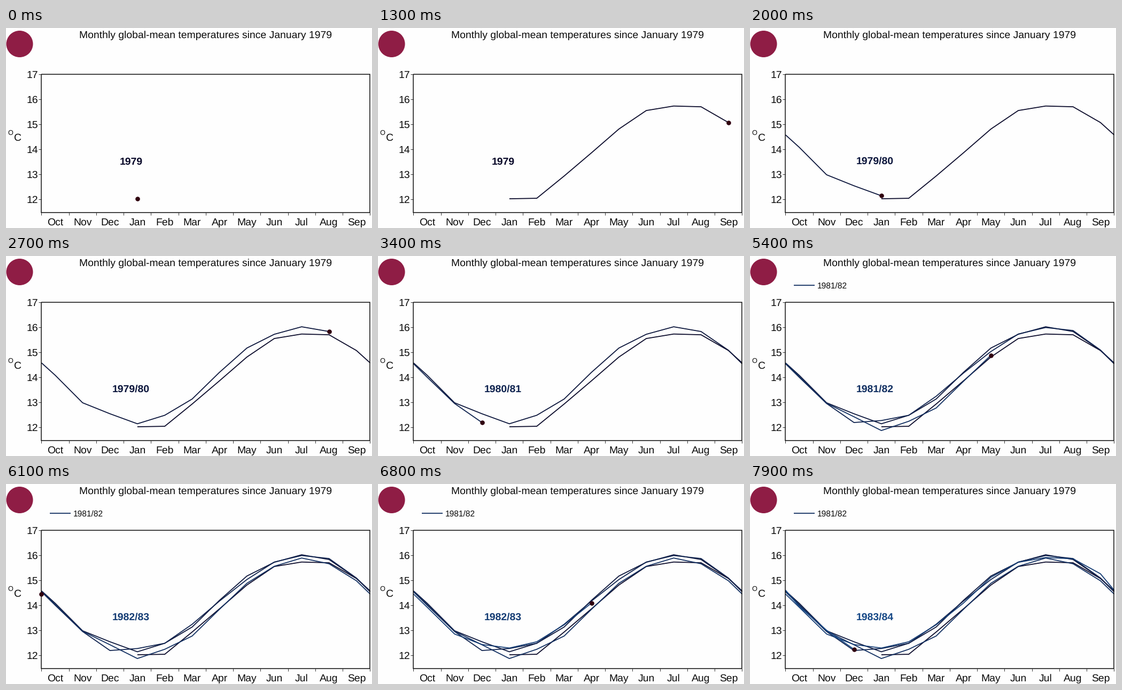
Write a matplotlib script that moves like this. It is 685 px wide and 376 px high and loops after 8 s.

```python
import matplotlib.pyplot as plt
import numpy as np
from matplotlib.animation import FuncAnimation
from matplotlib.patches import Circle

W, H, DPI = 685, 376, 100
LEFT, RIGHT, TOP, BOTTOM = 66.5, 681.5, 87, 346.5
STEP = (RIGHT - LEFT) / 12
MONTHS = "Oct Nov Dec Jan Feb Mar Apr May Jun Jul Aug Sep".split()
INK = "#0a0a0a"

plt.rcParams["font.family"] = "Liberation Sans"
plt.rcParams["text.hinting"] = "none"

# Monthly means from January 1979 on, one row per October-to-September year
TEMPS = [
    [12.02, 12.04, 12.93, 13.86, 14.81, 15.55, 15.73, 15.70, 15.07],
    [14.08, 12.98, 12.54, 12.14, 12.48, 13.13, 14.20, 15.17, 15.72, 16.02, 15.83, 15.08],
    [14.00, 12.95, 12.19, 12.27, 12.48, 13.24, 14.17, 15.03, 15.73, 15.99, 15.87, 15.09],
    [14.03, 12.96, 12.42, 11.87, 12.24, 12.77, 13.84, 14.88, 15.56, 15.89, 15.66, 14.98],
    [13.92, 12.85, 12.43, 12.29, 12.54, 13.22, 14.09, 15.12, 15.72, 15.91, 15.86, 15.26],
    [13.95, 13.00, 12.24],
]
LABELS = ["1979"] + [f"{y}/{y % 100 + 1}" for y in range(1979, 1984)]
LEGEND_YEAR = 3


def px(pixels):
    """Pixels to points."""
    return pixels * 72 / DPI


def y_of(temp):
    return 322 - 47 * (np.asarray(temp) - 12)


def colour(year):
    start, end = np.array([10, 10, 42]), np.array([22, 72, 134])
    return tuple((start + (end - start) * year / 5) / 255)


def build_curves():
    """Pixel path of each year, reaching the frame edges halfway between months."""
    curves = []
    for i, temps in enumerate(TEMPS):
        first = 3 if i == 0 else 0
        x = [LEFT + STEP * (first + k + 0.5) for k in range(len(temps))]
        t = list(temps)
        if i > 0:
            x.insert(0, LEFT)
            t.insert(0, (TEMPS[i - 1][-1] + temps[0]) / 2)
        if i < len(TEMPS) - 1:
            x.append(RIGHT)
            t.append((temps[-1] + TEMPS[i + 1][0]) / 2)
        curves.append((np.array(x), y_of(t)))
    return curves


CURVES = build_curves()

# (year, point) per frame; each year pauses on its first point
SCHEDULE = []
for year, (xs, _) in enumerate(CURVES):
    SCHEDULE += [(year, 0)] * (5 if year == 0 else 1)
    SCHEDULE += [(year, k) for k in range(len(xs))]

fig = plt.figure(figsize=(W / DPI, H / DPI), dpi=DPI, facecolor="#fefefe")
ax = fig.add_axes([0, 0, 1, 1])
ax.set_xlim(0, W)
ax.set_ylim(H, 0)
ax.axis("off")


def text(x, y, s, size=19.4, ha="center", **kw):
    return ax.text(x, y, s, fontsize=px(size), ha=ha, va="baseline",
                   **{"color": INK, **kw})


def line(x, y, width, color=INK, **kw):
    return ax.plot(x, y, lw=px(width), color=color,
                   solid_capstyle="butt", **kw)[0]


ax.add_patch(Circle((25.5, 30), 25, fc="#8f1d45", ec="none"))
text(374, 19, "Monthly global-mean temperatures since January 1979")
text(8, 201, "O", size=12.6)
text(21, 212, "C")

line([LEFT, RIGHT, RIGHT, LEFT, LEFT], [TOP, TOP, BOTTOM, BOTTOM, TOP], 1.5,
     solid_joinstyle="miter", zorder=4)
for temp in range(12, 18):
    y = y_of(temp)
    line([61, LEFT], [y, y], 1, "#333333")
    text(60, y + 7, str(temp), ha="right")
for k in range(13):
    x = LEFT + k * STEP
    line([x, x], [BOTTOM, 351.5], 1, "#333333")
    if k < 12:
        text(x + STEP / 2, 371, MONTHS[k])

legend = [
    line([82, 121], [55, 55], 1.8, colour(LEGEND_YEAR)),
    text(126, 60.5, LABELS[LEGEND_YEAR], size=15.5, ha="left"),
]
lines = [line([], [], 1.8, colour(i), zorder=3) for i in range(len(CURVES))]
year_label = text(234, 257, "", weight="bold")
dot, = ax.plot([], [], "o", ms=px(8.6), mfc="#30000f", mec="none", zorder=6)


def draw(frame):
    year, k = SCHEDULE[frame]
    for i, (curve, (x, y)) in enumerate(zip(lines, CURVES)):
        n = len(x) if i < year else k + 1 if i == year else 0
        curve.set_data(x[:n], y[:n])
    x, y = CURVES[year]
    dot.set_data([x[k]], [y[k]])
    year_label.set_text(LABELS[year])
    year_label.set_color(colour(year))
    for part in legend:
        part.set_visible(year >= LEGEND_YEAR)
    return [*lines, *legend, year_label, dot]


anim = FuncAnimation(fig, draw, frames=len(SCHEDULE), interval=100, repeat=True)
plt.show()
```
